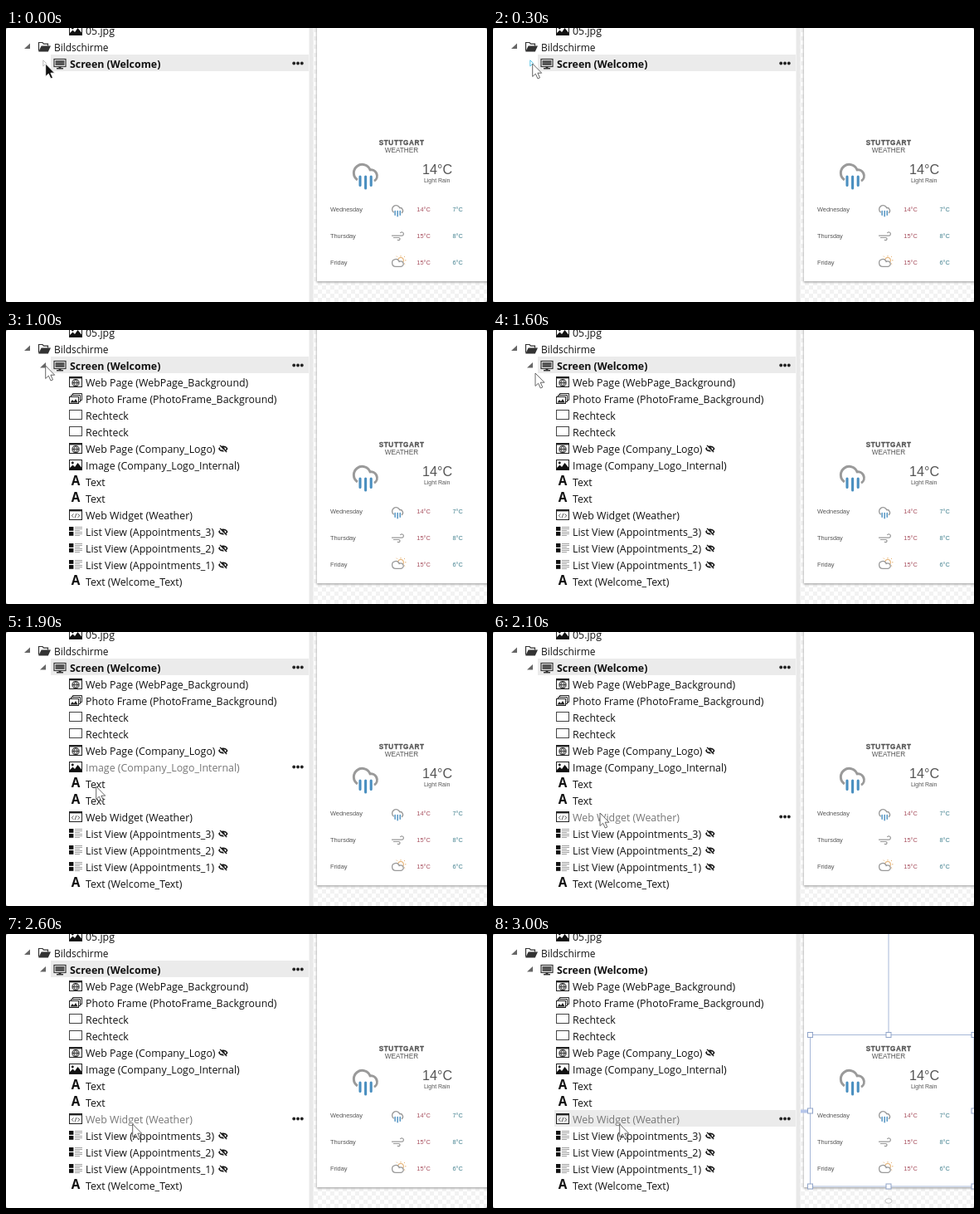
Recreate the animation shown at these times as an HTML page. Size 580 by 330 pixels, loop 3800 ms.

```html
<!DOCTYPE html>
<html lang="de">
<head>
<meta charset="utf-8">
<style>
html, body { margin: 0; width: 100%; height: 100%; overflow: hidden; background: #fff; }
svg { display: block; }
text { font-family: "Open Sans", "Noto Sans", sans-serif; font-size: 12.4px; fill: #111; }
.w text { font-family: "Liberation Sans", Arial, sans-serif; font-size: 7.4px; fill: #555; }
.w .hi { fill: #a64d5c; }
.w .lo { fill: #42808f; }
</style>
</head>
<body>
<svg id="stage" width="580" height="330" viewBox="0 0 580 330"></svg>
<script>
const LOOP = 3800, EXPAND = 1000, SELECT = 3000;
const rows = [
  ['web', 'Web Page (WebPage_Background)'],
  ['photos', 'Photo Frame (PhotoFrame_Background)'],
  ['rect', 'Rechteck'],
  ['rect', 'Rechteck'],
  ['web', 'Web Page (Company_Logo)', true],
  ['image', 'Image (Company_Logo_Internal)'],
  ['letter', 'Text'],
  ['letter', 'Text'],
  ['widget', 'Web Widget (Weather)'],
  ['list', 'List View (Appointments_3)', true],
  ['list', 'List View (Appointments_2)', true],
  ['list', 'List View (Appointments_1)', true],
  ['letter', 'Text (Welcome_Text)']
];
const WIDGET = 8;
// time, x, y of the pointer tip
const path = [[1500, 47.7, 43], [1600, 51, 52], [1700, 61, 90], [1800, 85, 147], [1900, 108.7, 186],
  [2000, 121, 210], [2100, 129, 218], [2200, 147, 227], [2300, 152.7, 229]];

const text = (x, y, s, attr = '') => `<text x="${x}" y="${y}" ${attr}>${s}</text>`;
const rect = (x, y, w, h, fill, attr = '') => `<rect x="${x}" y="${y}" width="${w}" height="${h}" fill="${fill}" ${attr}/>`;
const line = (d, color, w = 1, attr = '') => `<path d="${d}" fill="none" stroke="${color}" stroke-width="${w}" ${attr}/>`;
const shape = (d, fill) => `<path d="${d}" fill="${fill}"/>`;
const at = (x, y, s, scale = 1) => `<g transform="translate(${x} ${y}) scale(${scale})">${s}</g>`;

// Tree icons are centred on 0,0
const ink = '#222';
const box = rect(-7.5, -6.5, 15, 12, 'none', `stroke="${ink}"`) + rect(-8, -7, 16, 2.4, ink);
const icons = {
  web: box + `<circle cy=".6" r="4.1" fill="#ccc" stroke="${ink}"/>` +
    line('M-4 .6H4M0 -3.4C-2.6 -1 -2.6 2.2 0 4.6C2.6 2.2 2.6 -1 0 -3.4', ink, .8),
  photos: line('M-3.5 -4V-6.5H7.5V1.5H6', ink) + line('M-5.5 -2V-4.5H5.5V3.5H4', ink) +
    rect(-7.5, -2.5, 11, 8, '#fff', `stroke="${ink}"`) + shape('M-6.5 4.5L-4 1L-2 3L0 0L2.7 4.5Z', ink),
  rect: rect(-7.5, -6.5, 15, 11, '#fff', 'stroke="#444"'),
  image: rect(-7.5, -6.5, 15, 12, '#fff', `stroke="${ink}"`) +
    '<circle cx="-3.7" cy="-3" r="1.4"/>' + shape('M-7 5V3L-3.5 -.5L-1 2L2.5 -3L7 2.5V5Z', '#111'),
  letter: text(0, 4.2, 'A', 'text-anchor="middle" style="font-size:15.3px;font-weight:700"'),
  widget: box + line('M-2.5 -1.6L-4.8 .6L-2.5 2.8M2.5 -1.6L4.8 .6L2.5 2.8M.9 -2L-.9 3.2', '#444', .9),
  list: [-6, 0].map(y => rect(-8, y, 5.4, 4.8, '#111') +
    line(`M-1 ${y + .5}H8M-1 ${y + 2.5}H8M-1 ${y + 4.5}H5`, '#888', .8)).join(''),
  screen: rect(-7, -5.5, 14, 9, '#fff', 'stroke="#333" stroke-width="1.2"') + rect(-5.5, -4, 11, 6, '#555') +
    rect(-4, 5, 8, 1.5, '#333') + rect(-1.5, 3.5, 3, 2, '#333'),
  folder: line('M-6.5 4.5V-5.5H-2L-.5 -3.8H4.5V-1.5', '#333', 1.2) + shape('M-6.8 5.5L-3.4 -1.6H8L4.8 5.5Z', '#333'),
  hidden: line('M-5.5 0C-3 -4.2 3 -4.2 5.5 0C3 4.2 -3 4.2 -5.5 0Z', '#111', 1.6) +
    '<circle r="2.2" fill="#111"/>' + line('M-4.8 -3.6L4.2 4.4', '#fff', 2.4) + line('M-4.2 -4.6L4.8 4.4', '#111', 1.5)
};
const dots = y => [347.2, 352, 356.8].map(x => `<circle cx="${x}" cy="${y - .5}" r="1.9" fill="#222"/>`).join('');
const opened = (x, y) => shape(`M${x} ${y - 3.5}V${y + 3}H${x - 7}Z`, '#666');
const rowY = i => 63 + 20 * i;

// Weather panel
const rain = line('M5.8 20A10.2 10.2 0 1 1 21.2 8.3M19.8 8.2A7.3 7.3 0 0 1 26 21.3', '#9a9a9a', 3) +
  line('M9 16V26.5M15.6 16V30M22.2 16V26.5', '#4a8fc0', 3.1, 'stroke-linecap="round"');
const wind = line('M0 4.6H12.2A2.1 2.1 0 1 0 10.4 1.6M2 7H8.4A1.6 1.6 0 1 1 7 9.4', '#999', 1.2);
const sunny = '<circle cx="11" cy="5.3" r="3.3" fill="none" stroke="#e6b273" stroke-width="1.2"/>' +
  line('M11 -.5V1M15 1.5L16 .5M6.8 1.2L5.8 .2M16 5.3H17.5M15 9L16.2 10', '#e6b273') +
  '<path d="M5 12.8A4.4 4.4 0 1 1 9.2 7A3.2 3.2 0 1 1 11.4 12.8Z" fill="#fff" stroke="#999" stroke-width="1.3"/>';
const forecast = [['Wednesday', 14, 7, at(465, 213, rain, .46)], ['Thursday', 15, 8, at(465, 245.5, wind)], ['Friday', 15, 6, at(465, 274.5, sunny)]];
const mid = 'text-anchor="middle"';
const weather = '<g class="w">' +
  text(477.2, 140.5, 'STUTTGART', mid + ' style="font-size:8.2px;font-weight:bold;letter-spacing:.6px" stroke="#555" stroke-width=".3"') +
  text(477, 150, 'WEATHER', mid + ' style="font-size:8.2px"') +
  at(418, 163, rain) +
  text(502, 176.2, '14°C', 'style="font-size:16.2px"') +
  text(519.7, 186, 'Light Rain', mid + ' style="font-size:7px"') +
  forecast.map(([day, hi, lo, icon], i) => {
    const y = 221.1 + 32 * i;
    return text(391, y, day) + icon + text(495.3, y, hi + '°C', 'class="hi"') + text(538.5, y, lo + '°C', 'class="lo"');
  }).join('') + '</g>';

const blue = '#a7b8d8';
const handles = [[382.5, 121.5], [477, 121.5], [580, 121.5], [382.5, 213], [580, 213], [382.5, 304], [477, 304], [580, 304]]
  .map(([x, y]) => rect(x - 3, y - 3, 6, 6, '#fff', 'stroke="#8fa3c8"')).join('');

stage.innerHTML = `
<defs><pattern id="check" width="10" height="10" x="371" y="0" patternUnits="userSpaceOnUse">
${rect(0, 0, 10, 10, '#fff') + rect(0, 0, 5, 5, '#f2f2f2') + rect(5, 5, 5, 5, '#f2f2f2')}</pattern>
<filter id="soft"><feGaussianBlur stdDeviation="1"/></filter></defs>
${rect(0, 0, 580, 330, '#fff')}
${rect(370, 0, 210, 330, 'url(#check)') + rect(365.5, 0, 5, 330, '#e9e9e9')}
${rect(374.5, -9, 220, 315.5, '#aaa', 'filter="url(#soft)"') + rect(375, 0, 205, 305, '#fff')}
${weather}
<g id="picked">${line('M477 0V121', blue) + rect(382.5, 121.5, 197.5, 182.5, 'none', `stroke="${blue}"`)}
${rect(371, 211.5, 9, 4, '#b6c6ea') + handles}
<ellipse cx="477" cy="321.5" rx="4" ry="2.8" fill="#fff" stroke="#c4c4c4"/></g>
${rect(54, 32, 311, 20, '#ebebeb', 'id="mark"')}
${at(84, 3, icons.image) + text(96, 8, '05.jpg')}
${opened(29, 22) + at(46, 23, icons.folder) + text(58, 28, 'Bildschirme', 'style="font-size:11.95px"')}
${at(65, 43, icons.screen) + text(77, 48, 'Screen (Welcome)', 'style="font-weight:bold"')}
<path id="closed" d="M44.8 38.8V46L48.5 42.4Z" fill="#fff"/>
<g id="tree">${opened(48, 42.5)}
${rows.map(([icon, name, off], i) => at(84, rowY(i), icons[icon]) + text(96, rowY(i) + 5, name, 'class="name"') +
  (off ? at(261.8, rowY(i), icons.hidden, .9) : '')).join('')}</g>
<g id="more">${dots(0)}</g><g id="more0">${dots(43)}</g>
<path id="pointer" d="M0 0V15.5L3.6 12.2L6.3 18L8.8 16.9L6.2 11.2H11Z" stroke-width=".9"/>
${[[0, 0], [580, 0], [0, 330], [580, 330]].map(([x, y]) => `<circle cx="${x}" cy="${y}" r="1.5" fill="#aaa"/>`).join('')}`;

const el = id => document.getElementById(id);
const names = [...document.querySelectorAll('.name')];
const set = (id, attrs) => { for (const k in attrs) el(id).setAttribute(k, attrs[k]); };
const show = (id, on) => set(id, { visibility: on ? 'visible' : 'hidden' });

function tip(t) {
  const n = path.findIndex(p => p[0] > t);
  if (n === 0) return path[0].slice(1);
  if (n < 0) return path[path.length - 1].slice(1);
  const a = path[n - 1], b = path[n], k = (t - a[0]) / (b[0] - a[0]);
  return [a[1] + (b[1] - a[1]) * k, a[2] + (b[2] - a[2]) * k];
}

function draw(now) {
  const t = Math.floor(now % LOOP / 100) * 100;
  const [x, y] = tip(t);
  const open = t >= EXPAND, picked = t >= SELECT, early = t < 100;
  const hover = open ? Math.floor((tip(t - 50)[1] - 53) / 20) : -1; // hover trails the pointer
  show('tree', open);
  show('closed', !open);
  set('closed', { stroke: early ? '#bbb' : '#55c3e6' });
  names.forEach((n, i) => n.style.fill = i === hover ? '#777' : '');
  show('more', hover >= 0);
  set('more', { transform: `translate(0 ${rowY(hover)})` });
  show('more0', !picked);
  show('picked', picked);
  set('mark', picked ? { x: 74, y: rowY(WIDGET) - 11, width: 291 } : { x: 54, y: 32, width: 311 });
  set('pointer', { transform: `translate(${x} ${y})`, fill: early ? '#111' : '#fff', stroke: early ? '#fff' : '#555' });
}

const start = performance.now();
function tick() {
  draw(performance.now() - start);
  requestAnimationFrame(tick);
}
tick();
</script>
</body>
</html>
```
